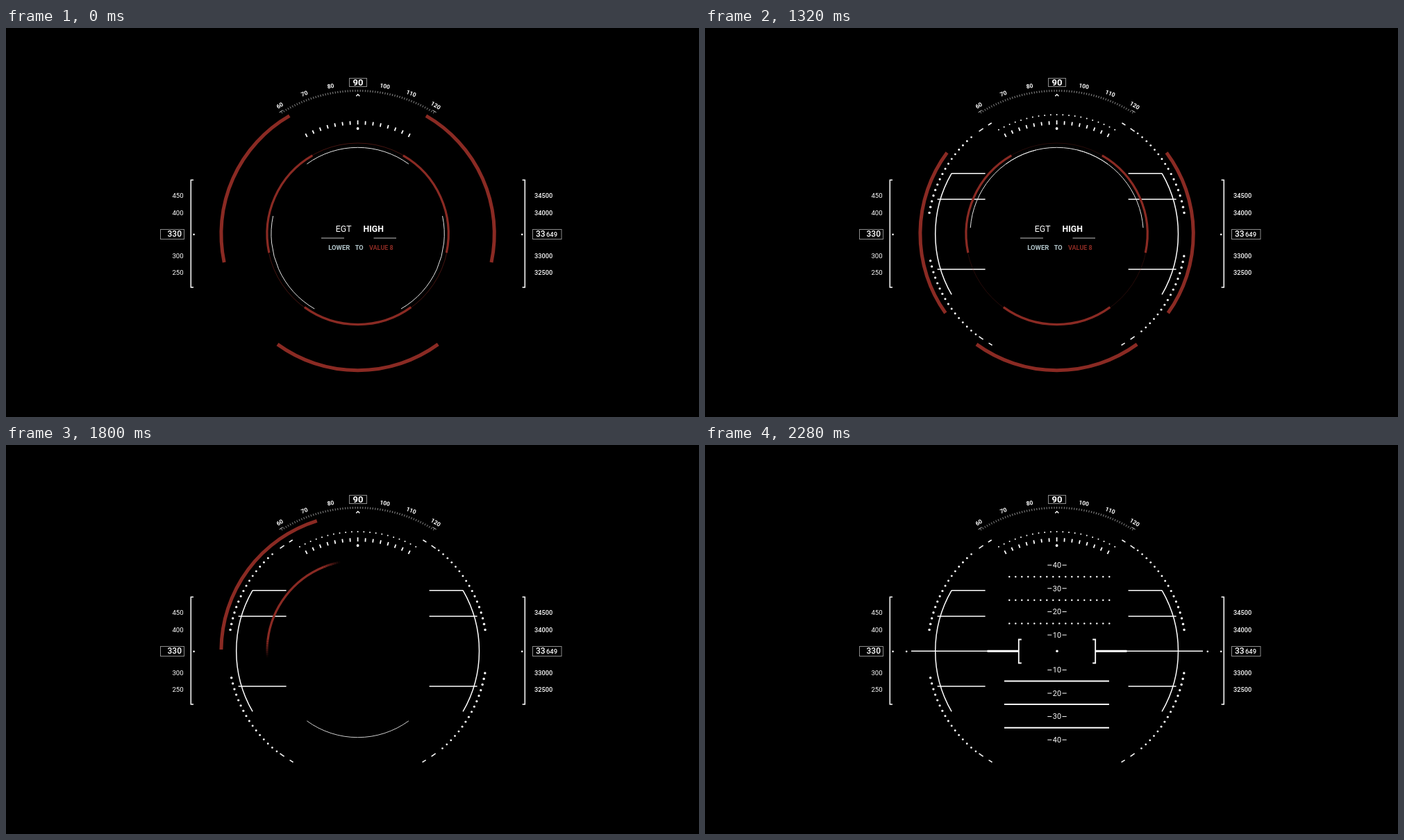
An HTML page with a canvas for the animation above (2.32 s loop, 998 by 561 pixels).

```html
<!DOCTYPE html>
<html lang="en">
<head>
<meta charset="utf-8">
<title>Flight display</title>
<style>
  html, body { margin: 0; width: 100%; height: 100%; overflow: hidden; background: #000; }
  canvas { display: block; width: 998px; height: 561px; }
</style>
</head>
<body>
<canvas id="stage" width="998" height="561"></canvas>
<script>
const ctx = document.getElementById('stage').getContext('2d');
const LOOP = 2320, STEP = 40;
const CX = 506.6, CY = 297;
const RED = '#8a2a23', WHITE = '#fff', GREY = '#8c8c8c';
const FONT = 'Roboto, "Open Sans", sans-serif';
const SPAN = 72, HALF = SPAN / 2, SPREAD = 114;

const clamp = x => Math.max(0, Math.min(1, x));
const ramp = (t, from, to) => clamp((t - from) / (to - from));
const ease = x => x < 0.5 ? 4 * x ** 3 : 1 - 4 * (1 - x) ** 3;
const move = (t, from, to) => ease(ramp(t, from, to));
const rad = deg => (deg - 90) * Math.PI / 180;

// Angles are in degrees, clockwise from the top.
const polar = (r, deg) => [CX + r * Math.cos(rad(deg)), CY + r * Math.sin(rad(deg))];

function withAlpha(alpha, draw) {
  if (alpha <= 0) return;
  ctx.save();
  ctx.globalAlpha *= alpha;
  draw();
  ctx.restore();
}

function path(points, width = 1.5, color = WHITE) {
  ctx.beginPath();
  points.forEach(([x, y]) => ctx.lineTo(x, y));
  ctx.lineWidth = width;
  ctx.strokeStyle = color;
  ctx.stroke();
}

const hline = (x1, x2, y, width, color) => path([[x1, y], [x2, y]], width, color);

function arc(r, from, to, width, color) {
  ctx.beginPath();
  ctx.arc(CX, CY, r, rad(from), rad(to));
  ctx.lineWidth = width;
  ctx.strokeStyle = color;
  ctx.stroke();
}

const segment = (r, mid, width, color) => arc(r, mid - HALF, mid + HALF, width, color);

function blurredSegment(r, mid, width, color, blur) {
  const solid = HALF - blur / 2, slices = 8, size = blur / slices;
  arc(r, mid - solid, mid + solid, width, color);
  if (blur < 0.2) return;
  for (let i = 0; i < slices; i++) {
    const a = solid + i * size;
    withAlpha(1 - (i + 0.5) / slices, () => {
      arc(r, mid + a, mid + a + size, width, color);
      arc(r, mid - a - size, mid - a, width, color);
    });
  }
}

function dot(x, y, r) {
  ctx.beginPath();
  ctx.arc(x, y, r, 0, Math.PI * 2);
  ctx.fillStyle = WHITE;
  ctx.fill();
}

function tick(r1, r2, deg, width, color) {
  path([polar(r1, deg), polar(r2, deg)], width, color);
}

function text(str, x, y, size, { weight = 400, align = 'left', color = WHITE } = {}) {
  ctx.font = `${weight} ${size}px ${FONT}`;
  ctx.textAlign = align;
  ctx.textBaseline = 'alphabetic';
  ctx.fillStyle = color;
  ctx.fillText(str, x, y + size * 0.356);
}

function box(x, y, w, h) {
  ctx.lineWidth = 1;
  ctx.strokeStyle = GREY;
  ctx.strokeRect(x, y, w, h);
}

function compass() {
  for (let d = -32; d <= 32; d++) tick(205, 208, d, 0.9, '#a0a0a0');
  for (const side of [-1, 1]) arc(208.5, side * 32 - 0.8, side * 32 + 0.8, 1, '#ccc');
  for (let value = 60; value <= 120; value += 10) {
    if (value === 90) continue;
    const deg = (value - 90) * 1.04;
    ctx.save();
    ctx.translate(...polar(216.8, deg));
    ctx.rotate(deg * Math.PI / 180);
    text(value, 0, 0, 8.5, { weight: 700, align: 'center' });
    ctx.restore();
  }
  box(494.5, 72.5, 25, 12);
  text('90', 507, 78.4, 13, { weight: 700, align: 'center' });
  path([[504.3, 98.2], [506.8, 95.8], [509.3, 98.2]], 1.4);

  for (let i = -7; i <= 7; i++) tick(157.8, i ? 163 : 163.8, i * 3.93, 1.8);
  dot(506.6, 145, 1.9);
}

function sideScales() {
  path([[270, 219.2], [266.3, 219.2], [266.3, 374], [270, 374]]);
  path([[743.6, 219.2], [747.3, 219.2], [747.3, 374], [743.6, 374]]);
  dot(270.6, 297.8, 1.3);
  dot(743.2, 297.8, 1.3);
  box(222.5, 290.5, 34, 14);
  box(758.5, 290.5, 41.5, 14);
  text('330', 253, 297.2, 12, { align: 'right', weight: 500 });
  text('33', 763, 297.2, 12, { weight: 500 });
  text('649', 778, 297.8, 9.4, { weight: 500 });
  const rows = [[241.3, 450, 34500], [266.5, 400, 34000], [328.3, 300, 33000], [352.5, 250, 32500]];
  for (const [y, left, right] of rows) {
    text(left, 255.6, y, 9.6, { align: 'right' });
    text(right, 761, y, 9.2, { weight: 500 });
  }
}

function dotArc(from, count, sign) {
  for (let i = 0; i < count; i++) {
    const deg = from + i * 2.61;
    const [x, y] = polar(186, sign * deg);
    dot(x, y, 1.25 + 0.5 * Math.sin(deg * Math.PI / 180) ** 4);
  }
}

function dials() {
  for (let i = -10; i <= 10; i++) dot(...polar(172, i * 2.91), 1);

  dotArc(41.4, 16, -1);
  dotArc(38.8, 17, 1);
  dotArc(102, 16, -1);
  dotArc(99.9, 16, 1);

  for (const s of [-1, 1]) {
    for (const deg of [31.3, 36, 144, 149]) {
      const half = deg === 36 || deg === 144 ? 1.15 : 0.9;
      arc(185.5, s * deg - half, s * deg + half, 1.5, WHITE);
    }
    const at = dx => CX + s * dx;
    arc(174.9, s > 0 ? 60 : -120, s > 0 ? 120 : -60, 1.5, WHITE);
    hline(at(103), at(151.5), 209.8, 1.5);
    hline(at(103), at(172), 246.9, 1.5);
    hline(at(103), at(172), 348.1, 1.5);
  }
}

function warning(t) {
  const shownUntil = (end, draw) => { if (t < end) draw(); };
  shownUntil(1560, () => {
    text('EGT', 474.8, 290, 12.3);
    hline(454, 487, 303, 1, '#c4c4c4');
    hline(529.5, 562, 303, 1, '#c4c4c4');
  });
  shownUntil(1440, () => text('HIGH', 514.5, 290, 12.3, { weight: 700 }));
  shownUntil(1400, () => {
    const bold = color => ({ weight: 700, color });
    text('LOWER', 464.2, 316.5, 9.5, bold('#b3c6cb'));
    text('TO', 502.8, 316.5, 9.2, bold('#b3c6cb'));
    text('VALUE 8', 523, 316.5, 9, bold(RED));
  });
}

function outerRing(t) {
  const mid = 66 + SPREAD * move(t, 1143, 1619);
  withAlpha(clamp((1530 - t) / 160), () => {
    segment(196.7, mid, 5, RED);
    segment(196.7, -mid, 5, RED);
  });
  withAlpha(1 - ramp(t, 1920, 2060), () =>
    segment(196.7, 180 + 180 * move(t, 1524, 2000), 5, RED));
}

function innerRing(t) {
  const shutter = 8;
  const sides = time => 66 + SPREAD * move(time, 1320, 1552);
  const turn = time => 180 + 180 * move(time, 1640, 1915);
  const blurOf = angle => Math.abs(angle(t + shutter / 2) - angle(t - shutter / 2));

  withAlpha(0.5 * (1 - ramp(t, 1220, 1440)), () => arc(131, 0, 360, 1, RED));
  if (t < 1560) {
    for (const s of [-1, 1]) blurredSegment(130.6, s * sides(t), 3.2, RED, blurOf(sides));
  }
  withAlpha(1 - ramp(t, 1850, 1970), () =>
    blurredSegment(130.6, turn(t), 3.2, RED, blurOf(turn)));
}

function thinRing(t) {
  const mid = SPREAD * (1 - move(t, 1199, 1431));
  const turn = 180 * move(t, 1398, 1618);
  withAlpha(1 - ramp(t, 1780, 1960), () => {
    segment(124.7, turn, 1, '#e6e6e6');
    if (t < 1420) {
      segment(124.7, mid, 1, '#e6e6e6');
      segment(124.7, -mid, 1, '#e6e6e6');
    }
  });
}

function horizon(t) {
  const drift = 1.2 * (1 - ramp(t, 2120, 2280));
  for (let i = 1; i <= 4; i++) {
    for (const y of [307.6 - 33.6 * i, 290.8 + 33.6 * i]) {
      text(i * 10, 506.9, y + drift, 10.8, { align: 'center' });
      hline(493.3, 499.3, y + drift, 1);
      hline(514.5, 520.7, y + drift, 1);
    }
  }
  for (let row = 0; row < 3; row++) {
    for (let i = 0; i <= 16; i++) dot(438.3 + i * 9, 190 + row * 33.7 + drift, 1.2);
    hline(431, 582, 340.4 + row * 33.7 + drift, 2);
  }
  dot(507, 297.2, 1.8);
  for (const s of [-1, 1]) {
    const at = dx => 507 + s * dx;
    hline(at(100), at(210), 297.3, 1.6);
    hline(at(55), at(100.5), 297.3, 3);
    path([[at(51.2), 280.5], [at(55.2), 280.5], [at(55.2), 314.5], [at(51.2), 314.5]], 1.8);
    dot(at(216.8), 297.8, 1.3);
  }
}

function draw(t) {
  ctx.fillStyle = '#000';
  ctx.fillRect(0, 0, 998, 561);
  compass();
  sideScales();
  withAlpha(clamp((t - 960) / 160), dials);
  outerRing(t);
  innerRing(t);
  thinRing(t);
  warning(t);
  withAlpha(clamp((t - 2080) / 160), () => horizon(t));
}

function frame(now) {
  draw(Math.floor((now % LOOP) / STEP) * STEP);
  requestAnimationFrame(frame);
}
draw(0);
requestAnimationFrame(frame);
</script>
</body>
</html>
```
